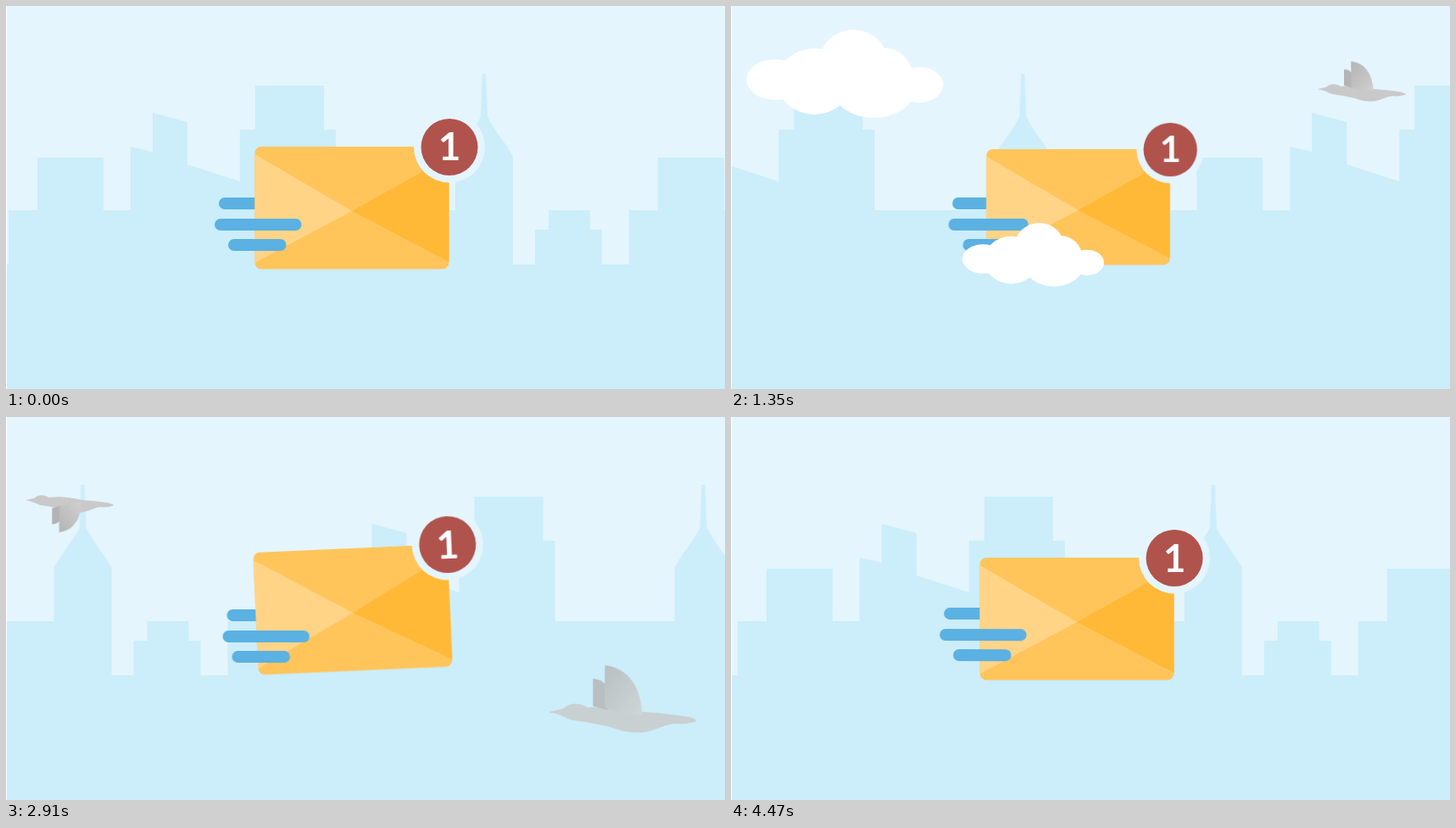
Animation, 848 px wide and 452 px high, one loop 4.5 s. Source, as an HTML page:

```html
<!DOCTYPE html>
<html lang="en">
<head>
<meta charset="utf-8">
<title>Flying message</title>
<style>
html, body { margin: 0; width: 100%; height: 100%; overflow: hidden; background: #e4f5fd; }
svg { display: block; width: 848px; height: 452px; }

.loop { animation: 4500ms linear infinite; }
.city { animation-name: city; }
.cloud-far { animation-name: cloud-far; }
.cloud-near { animation-name: cloud-near; }
.bird-far { animation-name: bird-far; }
.bird-near { animation-name: bird-near; }
.hover { animation-name: hover; animation-timing-function: ease-in-out; transform-origin: 408px 238px; }
.pulse { animation-name: pulse; animation-timing-function: ease-in-out; transform-origin: 434px 221px; }
.bars { animation-name: bars; transform-origin: 297px 258px; fill: #5ab1e2; }
.low-bar { animation-name: low-bar; }
.wing { animation: flap 180ms step-end infinite; }
.wing.late { animation-delay: -90ms; }

@keyframes city { to { transform: translateX(-732px); } }

@keyframes cloud-far {
  0% { transform: translateX(874px); }
  40.667% { transform: translateX(-285px); }
  40.668%, 66.667% { transform: translateX(921px); }
  100% { transform: translateX(-289px); }
}
@keyframes cloud-near {
  0%, 10% { transform: translateX(877px); }
  50%, 100% { transform: translateX(-330px); }
}
@keyframes bird-far {
  0%, 20% { transform: translateX(886px); }
  72%, 100% { transform: translateX(-117px); }
}
@keyframes bird-near {
  0%, 58% { transform: translateX(916px); }
  86%, 100% { transform: translateX(-234px); }
}
@keyframes flap {
  0% { transform: none; }
  50%, 100% { transform: translateY(9px) scaleY(-1); }
}
@keyframes hover {
  0%, 38.667% { transform: translate(0, 0) rotate(0deg); }
  50.667% { transform: translate(0, 7px) rotate(0deg); }
  64.667% { transform: translate(1px, -11px) rotate(-2.5deg); }
  83.333% { transform: translate(0, -5.5px) rotate(1.8deg); }
  99%, 100% { transform: translate(0, 0) rotate(0deg); }
}
@keyframes pulse {
  0%, 50.667%, 100% { transform: scale(1); }
  25.333% { transform: scale(.941); }
}
@keyframes bars {
  0%, 100% { transform: translate(0, 0) rotate(0deg) scale(1, 1); }
  22% { transform: translate(4px, -1px) rotate(0deg) scale(.9, .9); }
  22% { transform: translate(4px, -1px) rotate(0deg) scale(.9, 1); }
  38.667% { transform: translate(9px, 1px) rotate(0deg) scale(.94, 1); }
  50.667% { transform: translate(11.5px, -3.5px) rotate(0deg) scale(1, 1); }
  64.667% { transform: translate(9.5px, 1px) rotate(0deg) scale(1, 1); }
  83.333% { transform: translate(3px, -24px) rotate(2.8deg) scale(1, 1); }
}
@keyframes low-bar {
  0%, 100% { transform: translateX(0); }
  22% { transform: translateX(2px); }
  38.667% { transform: translateX(3px); }
  50.667% { transform: translateX(-2px); }
  64.667% { transform: translateX(-5px); }
  83.333% { transform: translateX(-2px); }
}
</style>
</head>
<body>
<svg viewBox="0 0 848 452">
  <defs>
    <path id="block" d="M3 306V241H37V179H115V241H147V166L173 172V126L214 137V187L276 207V146H294V94H375V146H389V241H530V178C538 162 550 150 560 131L562 80H566L568 131C578 150 590 162 598 178V306H624V264H640V241H689V264H703V306Z"/>
    <g id="cloud" fill="#fff">
      <ellipse cx="34" cy="59" rx="34" ry="24"/>
      <ellipse cx="80" cy="61" rx="44" ry="39"/>
      <ellipse cx="126" cy="37" rx="40" ry="37"/>
      <ellipse cx="150" cy="70" rx="48" ry="34"/>
      <ellipse cx="160" cy="55" rx="36" ry="34"/>
      <ellipse cx="204" cy="65" rx="28" ry="21"/>
    </g>
    <linearGradient id="plume" x1="0" y1="0" x2="1" y2="1">
      <stop offset="0" stop-color="#b4b4b4"/>
      <stop offset="1" stop-color="#d0d0d0"/>
    </linearGradient>
    <path id="body" fill="#c9c9c9" d="M0 0L16 -4C24 -11 35 -11 45 -5C66 -8 92 -4 110 0C130 1 150 4 164 6Q172 8 173 11Q162 15 147 14C135 15 128 20 120 22C107 26 94 25 81 21C60 14 42 12 28 10C18 8 14 2 0 1Z"/>
    <g id="wings">
      <path fill="#b3b3b3" d="M51 -39Q61 -39 68 -30V-2L51 -7Z"/>
      <path fill="url(#plume)" d="M65 -55C92 -52 108 -30 109 4L86 3L65 -5Z"/>
    </g>
  </defs>

  <rect width="848" height="452" fill="#e4f5fd"/>
  <g fill="#ccedfa">
    <rect y="305" width="848" height="147"/>
    <g class="loop city">
      <use href="#block"/>
      <use href="#block" x="732"/>
      <use href="#block" x="1464"/>
    </g>
  </g>

  <g class="loop cloud-far"><use href="#cloud" y="28"/></g>
  <g class="loop bird-far">
    <g transform="translate(0 98) scale(.595)">
      <use href="#body"/>
      <g class="wing late"><use href="#wings"/></g>
    </g>
  </g>

  <g class="loop bars"><rect x="251" y="226" width="68" height="14" rx="7"/></g>

  <g class="loop hover">
    <g class="loop pulse">
      <rect x="293.5" y="166" width="229" height="144.500" rx="8" fill="#ffc55b"/>
      <path fill="#ffd487" d="M293.500 175L408 242L293.500 303Z"/>
      <path fill="#ffb937" d="M522.500 178L408 242L522.500 302Z"/>
      <circle cx="523" cy="166.500" r="42" fill="#e4f5fd"/>
      <circle cx="523" cy="166.500" r="33.500" fill="#b0534d"/>
      <text x="523" y="182.500" text-anchor="middle" font-family="Lato, sans-serif" font-weight="700" font-size="46" fill="#fff">1</text>
    </g>
  </g>

  <g class="loop bars">
    <rect x="246" y="251" width="102.500" height="14" rx="7"/>
    <rect class="loop low-bar" x="262" y="275" width="68.500" height="14" rx="7"/>
  </g>

  <g class="loop cloud-near"><use href="#cloud" transform="translate(0 256) scale(.72)"/></g>
  <g class="loop bird-near" opacity=".8">
    <g transform="translate(0 348)">
      <use href="#body"/>
      <g class="wing"><use href="#wings"/></g>
    </g>
  </g>

  <rect width="1" height="452" fill="#fff"/>
</svg>
</body>
</html>
```
